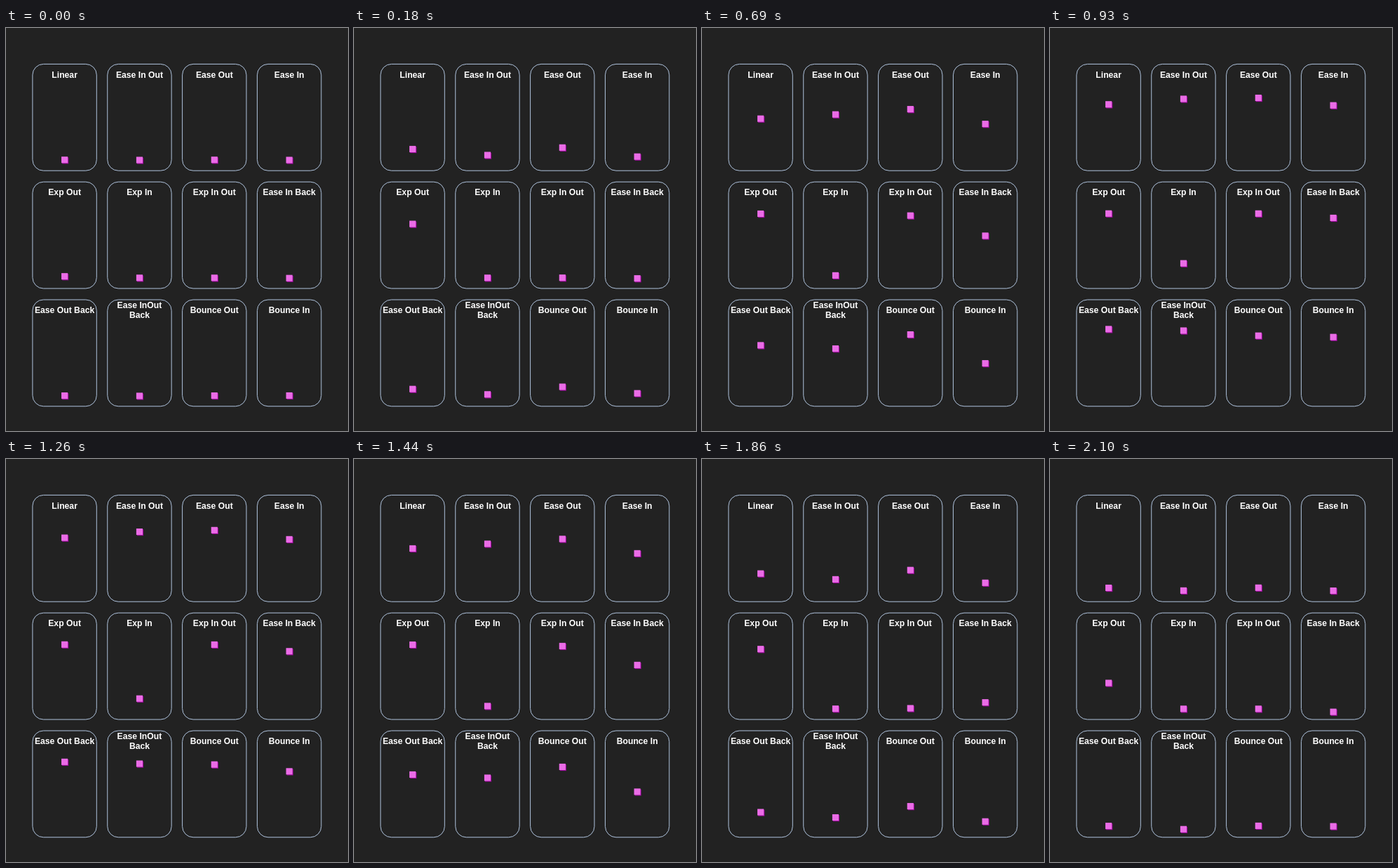
Recreate the animation shown at these times as an HTML page. Size 488x574 px, loop 2.13 s.

```html
<!DOCTYPE html>
<html lang="en">
<head>
<meta charset="utf-8">
<title>Easing curves</title>
<style>
  html, body { margin: 0; width: 100%; height: 100%; overflow: hidden; background: #222; }
  svg { display: block; width: 488px; height: 574px; }
  .card { fill: none; stroke: #b0c4de; stroke-width: 1; }
  .box { fill: #ea6ce6; }
  .shade { fill: #c400c4; opacity: .75; }
  text {
    font: bold 12.2px "Liberation Sans", Arial, sans-serif;
    fill: #fff;
    text-anchor: middle;
  }
</style>
</head>
<body>
<svg id="stage" viewBox="0 0 488 574"></svg>
<script>
const LOOP = 2130, STEP = 30;
const HALF = 1078, LEAD = 3;          // time of one way, head start at zero
const TRAVEL = 91.6, SIZE = 9.1;
const CARD = { x: 37.9, y: 51.4, w: 91.4, h: 151.8, r: 15.5, dx: 106.85, dy: 167.8 };

function bezier(x1, y1, x2, y2) {
  const at = (a, b, u) => 3 * a * u * (1 - u) ** 2 + 3 * b * u * u * (1 - u) + u ** 3;
  return p => {
    let lo = 0, hi = 1;
    for (let i = 0; i < 30; i++) {
      const mid = (lo + hi) / 2;
      if (at(x1, x2, mid) < p) lo = mid; else hi = mid;
    }
    return at(y1, y2, lo);
  };
}

const flip = ease => p => 1 - ease(1 - p);
const linear = p => p;
const smooth = p => p * p * (3 - 2 * p);
const easeOut = p => p + p * p - p ** 3;
const easeIn = flip(easeOut);
const expOut = bezier(.12, 1, .08, 1);
const expIn = flip(expOut);
const expInOut = p => p < .5 ? expIn(2 * p) / 2 : .5 + expOut(2 * p - 1) / 2;
const backIn = bezier(.2, -.33, .7, 1);
const backOut = flip(backIn);
const backInOut = bezier(.2, -.32, .8, 1.32);

// time and height of each turning point
const turns = [[0, 0], [.6, 1], [.7, .907], [.8, 1], [.87, .932], [.94, 1], [.97, .988], [1, 1]];
function bounceOut(p) {
  let i = 1;
  while (i < turns.length - 1 && p > turns[i][0]) i++;
  const [t0, v0] = turns[i - 1], [t1, v1] = turns[i];
  const ease = v1 > v0 ? easeIn : easeOut;
  return v0 + (v1 - v0) * ease((p - t0) / (t1 - t0));
}

const cells = [
  ["Linear", linear], ["Ease In Out", smooth], ["Ease Out", easeOut], ["Ease In", easeIn],
  ["Exp Out", expOut], ["Exp In", expIn], ["Exp In Out", expInOut], ["Ease In Back", backIn],
  ["Ease Out Back", backOut], ["Ease InOut|Back", backInOut],
  ["Bounce Out", bounceOut], ["Bounce In", flip(bounceOut)]
];

const stage = document.getElementById("stage");
function add(parent, tag, attrs, text = "") {
  const el = document.createElementNS("http://www.w3.org/2000/svg", tag);
  for (const key in attrs) el.setAttribute(key, attrs[key]);
  el.textContent = text;
  return parent.appendChild(el);
}

const movers = cells.map(([title, ease], i) => {
  const x = CARD.x + (i % 4) * CARD.dx;
  const y = CARD.y + Math.floor(i / 4) * CARD.dy;
  const cx = x + CARD.w / 2;
  add(stage, "rect", { class: "card", x, y, width: CARD.w, height: CARD.h, rx: CARD.r });
  const lines = title.split("|");
  lines.forEach((line, n) =>
    add(stage, "text", { x: cx, y: y + 19.1 + (n - (lines.length - 1) / 2) * 14 }, line));
  const group = add(stage, "g", {});
  const side = { x: -SIZE / 2, y: -SIZE / 2, width: SIZE, height: SIZE };
  add(group, "rect", { ...side, class: "shade", transform: "translate(1.1 1.1)" });
  add(group, "rect", { ...side, class: "box" });
  return { group, ease, cx, base: y + 136.6 };
});

function draw(time) {
  const t = Math.floor((time % LOOP) / STEP) * STEP + LEAD;
  const p = t < HALF ? t / HALF : 2 - t / HALF;
  for (const m of movers)
    m.group.setAttribute("transform", `translate(${m.cx} ${m.base - TRAVEL * m.ease(p)})`);
}

const start = performance.now();
function tick() {
  draw(performance.now() - start);
  requestAnimationFrame(tick);
}
tick();
</script>
</body>
</html>
```
